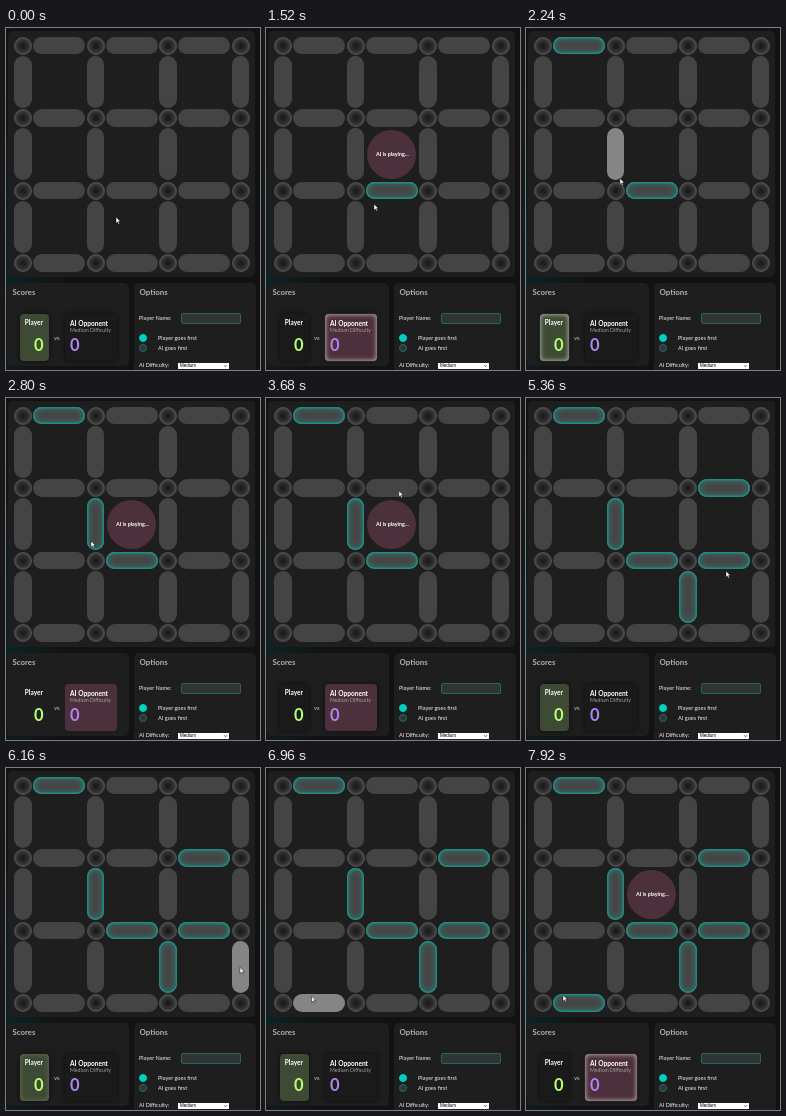
These frames come from a looping animation (254 px wide and 342 px high, 8 s). An HTML page:

```html
<!DOCTYPE html>
<html lang="en">
<head>
<meta charset="utf-8">
<title>Dots and Boxes</title>
<style>
html, body { margin: 0; width: 100%; height: 100%; overflow: hidden; background: #121212; }
#stage { position: relative; width: 254px; height: 342px; overflow: hidden; color: #f2f2f2;
  font-family: Lato, "Open Sans", sans-serif;
  background: radial-gradient(ellipse 60px 190px at 0 230px, #0a2526, #121212); }
#stage * { position: absolute; box-sizing: border-box; }
.panel { background: #1e1e1e; border-radius: 5px; }
.text { white-space: nowrap; line-height: 1; }
.dot { width: 18px; height: 18px; border-radius: 50%; border: 1px solid #4f4f4f;
  background: radial-gradient(closest-side, #1a1a1a 10%, #303030 70%, #484848); }
.line { border-radius: 9px; background: #444; }
.line.hover { background: #858585; }
.line.taken { background: #464646; box-shadow: inset 0 0 0 1.4px #238a82, inset 0 0 6px 1px #257f79; }
.card { top: 286px; height: 47px; border-radius: 4px; }
#note { left: 101px; top: 102px; width: 49px; height: 49px; border-radius: 50%; background: #4c303b; }
.radio { left: 133px; width: 8px; height: 8px; border-radius: 50%; border: 1px solid #206d68; background: #303636; }
.radio.on { background: #00d0c1; border-color: #00d0c1; }
#name { left: 174.5px; top: 285px; width: 60.5px; height: 10.5px; border: 1px solid #24655f; border-radius: 2px; background: #303434; }
#level { left: 172px; top: 335px; width: 51px; height: 6px; background: #fff; }
svg { left: 0; top: 0; overflow: visible; }
</style>
</head>
<body>
<div id="stage"></div>
<script>
const LOOP = 8000, STEP = 80, PITCH = 72.5;
const stage = document.getElementById('stage');

function add(cls, style = {}, id = '') {
  const el = document.createElement('div');
  el.className = cls;
  el.id = id;
  for (const k in style) el.style[k] = typeof style[k] === 'number' ? style[k] + 'px' : style[k];
  return stage.appendChild(el);
}

// y is the text baseline
function label(text, x, y, size, color = '#f2f2f2', weight = 400, font = '') {
  const el = add('text', { left: x, top: y - size * 0.85, fontSize: size, color, fontWeight: String(weight), fontFamily: font });
  el.textContent = text;
  return el;
}

add('panel', { left: 2, top: 3, width: 247, height: 246 });
add('panel', { left: 1, top: 255, width: 122, height: 83 });
add('panel', { left: 128, top: 255, width: 122, height: 100 });

// Board
const lines = {};
function addLine(key, x, y, w, h) {
  const el = add('line', { left: x, top: y, width: w, height: h });
  lines[key] = { el, x, y, w, h };
}
for (let r = 0; r < 4; r++) {
  for (let c = 0; c < 4; c++) {
    const x = 17 + c * PITCH, y = 17.5 + r * PITCH;
    add('dot', { left: x - 9, top: y - 9 });
    if (c < 3) addLine('h' + r + c, x + 10, y - 8.7, 52.3, 17.5);
    if (r < 3) addLine('v' + r + c, x - 8.7, y + 10, 17.5, 52.3);
  }
}

// Scores
const cards = {
  player: { el: add('card', { left: 14, width: 28.5 }), color: '#3e4a33', glow: '205,212,200' },
  ai: { el: add('card', { left: 59, width: 51.5 }), color: '#4c303b', glow: '222,206,213' }
};
label('Scores', 6.6, 268, 7.8, '#b0b0b0', 700);
label('Player', 18.8, 298, 6.5, '#fff', 700);
label('AI Opponent', 64, 298, 6.6, '#fff', 700);
label('Medium Difficulty', 64, 304.5, 5.2, '#a0a0a0');
label('vs', 48, 312, 6, '#ccc');
label('0', 28, 323.5, 16.5, '#b4ff72', 700);
label('0', 64, 323.5, 16.5, '#b184f2', 700);

// Options
label('Options', 133.4, 268, 7.9, '#b0b0b0', 700);
label('Player Name:', 133, 292, 5.6);
add('', {}, 'name');
add('radio on', { top: 306 });
add('radio', { top: 316 });
label('Player goes first', 152, 312, 5.6);
label('AI goes first', 152, 322, 5.6);
label('AI Difficulty:', 133, 340, 5.5);
add('', {}, 'level');
label('Medium', 174, 339.5, 4.5, '#000', 400, '"Liberation Sans", Arial, sans-serif');

const note = add('', {}, 'note');
const noteText = label('AI is playing...', 110, 128.3, 5.4, '#fff', 700);

stage.insertAdjacentHTML('beforeend',
  `<svg width="254" height="342">
    <path d="M218 337.2l1.5 1.5 1.5-1.5" fill="none" stroke="#222" stroke-width=".7"/>
    <path id="cursor" d="M0 0V6.3L1.5 5 2.5 7.3 3.5 6.8 2.5 4.6H4.4Z" fill="#fff" stroke="#111" stroke-width=".5"/>
  </svg>`);
const cursor = document.getElementById('cursor');

// Each move hands the turn to the other side
const moves = [
  [960, 'h21'], [1920, 'h00'], [2800, 'v11'], [3760, 'v22'],
  [4400, 'h12'], [5360, 'h22'], [7360, 'h30']
];

// Cursor stops: time, x, y
const stops = [
  [0, 110, 189], [160, 110, 189], [720, 124, 162], [960, 122, 163], [1520, 108, 176],
  [1920, 106, 172], [2480, 86, 136], [2800, 85, 143], [3360, 88, 140], [3920, 162, 62],
  [4320, 202, 91], [4400, 202, 92], [4720, 202, 94], [5280, 200, 173], [5440, 200, 173],
  [5920, 234, 195], [6240, 234, 200], [6560, 140, 302], [6880, 46, 230], [6960, 45.5, 228],
  [7360, 40, 230], [7920, 37, 227], [8000, 37, 227]
];

function cursorAt(t) {
  const i = stops.findIndex(s => s[0] > t);
  const [t0, x0, y0] = stops[i - 1], [t1, x1, y1] = stops[i];
  const u = (t - t0) / (t1 - t0), e = u * u * (3 - 2 * u);
  return [x0 + (x1 - x0) * e, y0 + (y1 - y0) * e];
}

const flash = age => age < 880 ? Math.sin(Math.PI * age / 880) : 0;

function draw(t) {
  const done = moves.filter(m => m[0] <= t);
  const n = done.length;
  const aiTurn = n % 2 === 1;
  const age = n ? t - done[n - 1][0] : Infinity;
  const held = n > 1 ? done[n - 1][0] - done[n - 2][0] : Infinity;
  const taken = new Set(done.map(m => m[1]));
  const [cx, cy] = cursorAt(t);
  cursor.setAttribute('transform', `translate(${cx} ${cy})`);

  for (const key in lines) {
    const { el, x, y, w, h } = lines[key];
    const over = !aiTurn && cx >= x && cx < x + w && cy >= y && cy < y + h;
    el.className = 'line' + (taken.has(key) ? ' taken' : over ? ' hover' : '');
  }
  note.hidden = noteText.hidden = !aiTurn;

  // The active card flashes a light rim once; a cut-off flash fades out
  const shade = aiTurn ? Math.min(1, age / 500) : 1;
  for (const who in cards) {
    const { el, color, glow } = cards[who];
    const active = (who === 'ai') === aiTurn;
    const rim = active ? flash(age) : flash(held) * 0.5 * Math.max(0, 1 - age / 400);
    el.style.background = active ? color : `rgba(26,26,26,${shade})`;
    el.style.boxShadow = `inset 0 0 ${active ? 4 : 2}px 1px rgba(${glow},${rim * 0.75}),` +
      `0 0 2px rgba(${glow},${rim * 0.3}), 0 0 5px rgba(0,0,0,${shade * 0.6})`;
  }
}

const start = performance.now();
function tick() {
  const t = (performance.now() - start) % LOOP;
  draw(Math.floor(t / STEP) * STEP);
  requestAnimationFrame(tick);
}
tick();
</script>
</body>
</html>
```
